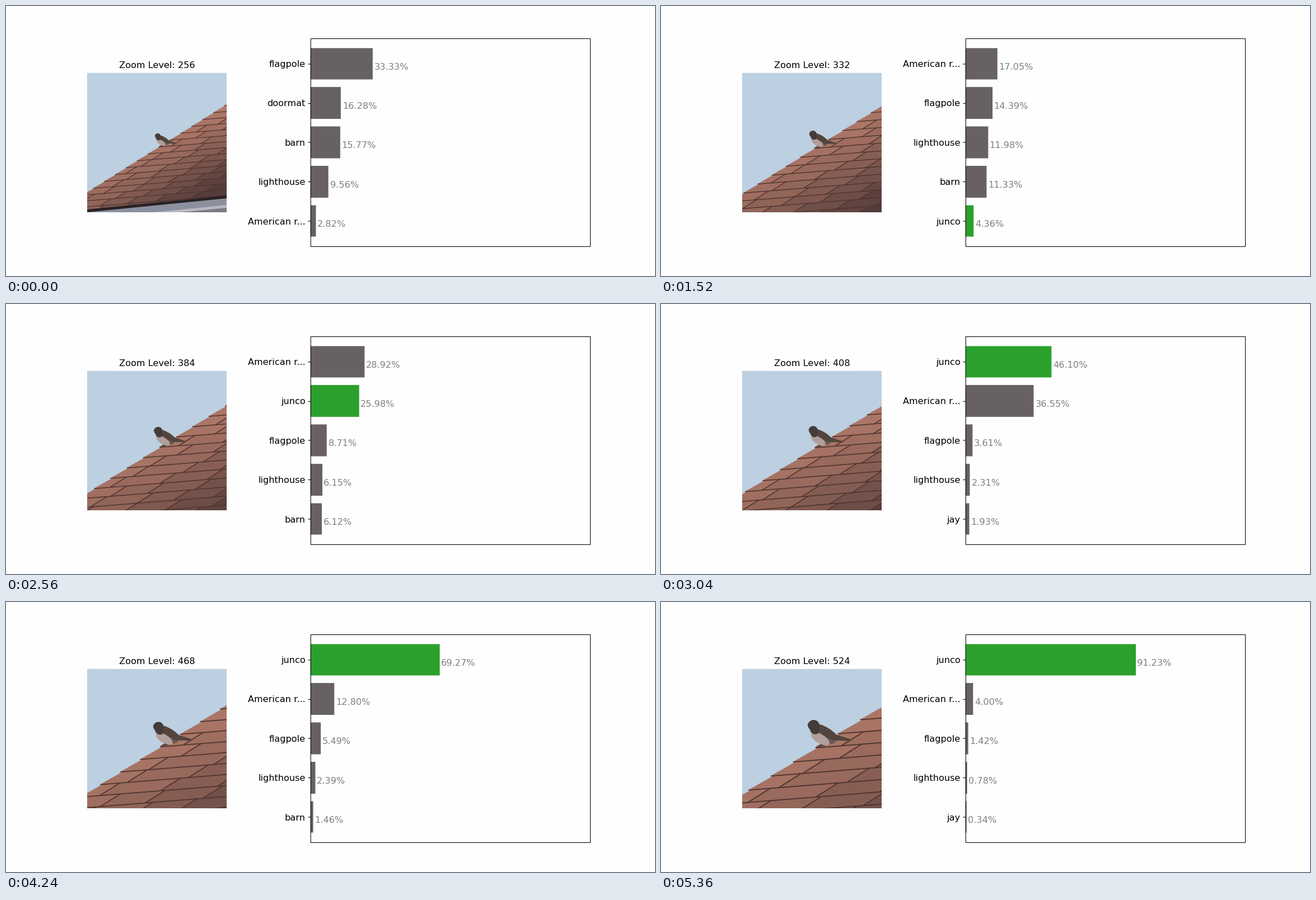
These frames come from a looping animation (1159 px wide and 483 px high, 8090 ms). A matplotlib script:

```python
import numpy as np
import matplotlib.pyplot as plt
from matplotlib.animation import FuncAnimation
from matplotlib.collections import LineCollection, PolyCollection
from matplotlib.patches import Ellipse, Polygon, Rectangle
from matplotlib.transforms import Affine2D

W, H, DPI = 1159, 483, 96
TICK_MS, STEP_MS, LOOP_MS, LAST_STEP = 10, 80, 8090, 67

# The layout lives on a 1200 x 500 grid (12 x 5 inches at 100 dpi)
GRID_W, GRID_H = 1200, 500
PT = W / (12 * DPI)         # one layout point in figure points
PX = 100 / 72               # one layout point in grid units

plt.rcParams["font.family"] = "DejaVu Sans"
plt.rcParams["font.size"] = 12 * PT
plt.rcParams["path.snap"] = False

LEFT, RIGHT, TOP, BOTTOM = 150, 1080, 60, 445
UNIT = (RIGHT - LEFT) / 3.6
CHART_X, CHART_W = LEFT + 1.6 * UNIT, 2 * UNIT
MID_X, MID_Y = LEFT + UNIT / 2, (TOP + BOTTOM) / 2
ROW = (BOTTOM - TOP) / 5.28
PER_ONE = CHART_W / 1.5

PAPER, GREY, GREEN = "#fefefe", "#676161", "#2ca02c"


def track(*points):
    """Straight moves between (step, percent) points."""
    steps, levels = zip(*points)
    return lambda t: np.interp(t, steps, levels)


SCORES = {
    "junco": track((0, 0.3), (26, 5.85), (38, 46.10), (47, 61.73),
                   (53, 69.27), (55, 85.8), (67, 91.23)),
    "American r...": track((0, 2.82), (12, 12.81), (26, 21.29), (38, 36.55),
                           (47, 24.80), (53, 12.80), (67, 4.00)),
    "flagpole": track((0, 33.33), (12, 14.97), (26, 13.82), (38, 3.61),
                      (47, 3.40), (53, 5.49), (67, 1.42)),
    "lighthouse": track((0, 9.56), (12, 13.97), (26, 9.99), (38, 2.31),
                        (47, 1.56), (53, 2.39), (67, 0.78)),
    "barn": track((0, 15.77), (12, 11.92), (26, 10.74), (38, 1.5),
                  (53, 1.46), (67, 0.3)),
    "doormat": lambda t: 16.28 * np.exp(-t / 11.225),
    "jay": lambda t: 1.933 * np.exp(-((t - 37.16) / 16) ** 2 / 2),
}


def rgb(r, g, b):
    return r / 255, g / 255, b / 255


fig = plt.figure(figsize=(W / DPI, H / DPI), dpi=DPI, facecolor=PAPER)
ax = fig.add_axes([0, 0, 1, 1])
ax.set_xlim(0, GRID_W)
ax.set_ylim(GRID_H, 0)
ax.axis("off")

# ---- photo: drawn around its centre and scaled by the zoom ----
zoom = Affine2D()
sky = Rectangle((LEFT, 124), 258, 258, fc=rgb(188, 208, 225), ec="none")
ax.add_patch(sky)


def in_photo(artist, z):
    artist.set_transform(zoom + ax.transData)
    artist.set_zorder(z)
    ax.add_artist(artist)
    artist.set_clip_path(sky)
    return artist


def strokes(segments, color, z):
    return in_photo(LineCollection(segments, colors=[color]), z)


def on_roof(u, n):
    """Point u along shingle course n, counted down from the ridge top."""
    x = 142 - 19.5 * n
    return x + u, 11.6 - 0.631 * x - 0.08 * u


def shingle_color(u, n):
    shade = min(1, 0.0032 * u + 0.015 * n)
    light, dark = np.array(rgb(182, 125, 108)), np.array(rgb(84, 60, 58))
    return light + (dark - light) * shade


rng = np.random.default_rng(4)
tiles, tile_colors, seams = [], [], []
for n in range(18):
    cuts = [0.0, rng.uniform(14, 46)]
    while cuts[-1] < 340:
        cuts.append(cuts[-1] + rng.uniform(42, 64))
    for a, b in zip(cuts, cuts[1:]):
        low = a if a else -2.5
        tiles.append([on_roof(a, n), on_roof(b, n),
                      on_roof(b, n + 1), on_roof(low, n + 1)])
        tile_colors.append(shingle_color((a + b) / 2, n))
        seams.append([on_roof(b, n), on_roof(b, n + 1)])
    seams.append([on_roof(-2.5, n + 1), on_roof(cuts[-1], n + 1)])

twigs = strokes([[(x, 78), (x + 7, 52)] for x in (-122, -115, -108)],
                rgb(198, 201, 217), 1)
in_photo(PolyCollection(tiles, facecolors=tile_colors,
                        edgecolors=tile_colors, linewidths=0.4), 1.1)
joints = strokes(seams, rgb(78, 52, 48), 1.2)

for depth, color in ((0, rgb(40, 34, 36)), (5, rgb(140, 144, 158)),
                     (17, rgb(182, 184, 194)), (22, rgb(126, 122, 130))):
    in_photo(Polygon([(-130, 120.5 + depth), (130, 94.5 + depth),
                      (130, 140), (-130, 140)], fc=color, ec="none"), 1.3)


def oval(x, y, w, h, angle, color):
    in_photo(Ellipse((x, y), w, h, angle=angle, fc=color, ec="none"), 1.5)


def wedge(color, *points):
    in_photo(Polygon(points, fc=color, ec="none"), 1.5)


HEAD, BACK = rgb(68, 59, 59), rgb(84, 68, 62)
oval(9.5, 5.6, 14, 2.6, -22, rgb(104, 70, 62))
wedge(BACK, (16, -5), (34.5, 1), (33.5, 2.4), (17, 1.6))
oval(9.3, -3.8, 26, 12.4, 33, rgb(104, 88, 83))
oval(7.2, 0.4, 18, 8, 30, rgb(176, 159, 154))
oval(13, -5.2, 24, 7.6, 33, BACK)
oval(1.4, -11.4, 10, 9.4, 0, HEAD)
oval(2.6, -8, 8, 9, -20, HEAD)
wedge(HEAD, (-4.2, -12.2), (-1, -14.2), (-1, -10.6))

title = ax.text(MID_X, MID_Y - UNIT / 2 - 6 * PX, "", ha="center")

# ---- bar chart ----
bars, names, values = [], [], []
for i in range(5):
    y = TOP + ROW * (0.64 + i)
    top, bottom = round(y - 0.4 * ROW), round(y + 0.4 * ROW)
    bar = Rectangle((round(CHART_X), top), 0, bottom - top, ec="none")
    bars.append(ax.add_patch(bar))
    names.append(ax.text(CHART_X - 7 * PX, y, "", ha="right",
                         va="center_baseline"))
    values.append(ax.text(0, y + 0.15 * ROW, "", color="grey"))
    tick_y = round(y) + 0.5
    ax.plot([CHART_X - 3.5 * PX, CHART_X], [tick_y, tick_y], color="black",
            lw=0.8 * PT, solid_capstyle="butt")
ax.add_patch(Rectangle((round(CHART_X) + 0.5, TOP + 0.5),
                       RIGHT - round(CHART_X), BOTTOM - TOP, fc="none",
                       ec="black", lw=0.8 * PT, zorder=2.5))


def draw(frame):
    step = min(frame * TICK_MS // STEP_MS, LAST_STEP)
    level = 256 + 4 * step
    scale = level / 256
    title.set_text(f"Zoom Level: {level}")
    zoom.clear().scale(scale * GRID_W / W).translate(MID_X, MID_Y)
    joints.set_linewidth(0.4 + 0.5 * scale)
    twigs.set_linewidth(0.8 * scale)

    scores = [(score(step), name) for name, score in SCORES.items()]
    best = sorted(scores, reverse=True)[:5]
    for (score, name), bar, label, value in zip(best, bars, names, values):
        end = CHART_X + score / 100 * PER_ONE
        bar.set_width(round(end) - round(CHART_X))
        bar.set_facecolor(GREEN if name == "junco" else GREY)
        label.set_text(name)
        value.set_text(f"{score:.2f}%")
        value.set_x(end + 2.8)
    return []


anim = FuncAnimation(fig, draw, frames=LOOP_MS // TICK_MS, interval=TICK_MS,
                     init_func=lambda: draw(0), repeat=True, repeat_delay=0,
                     cache_frame_data=False)
plt.show()
```
